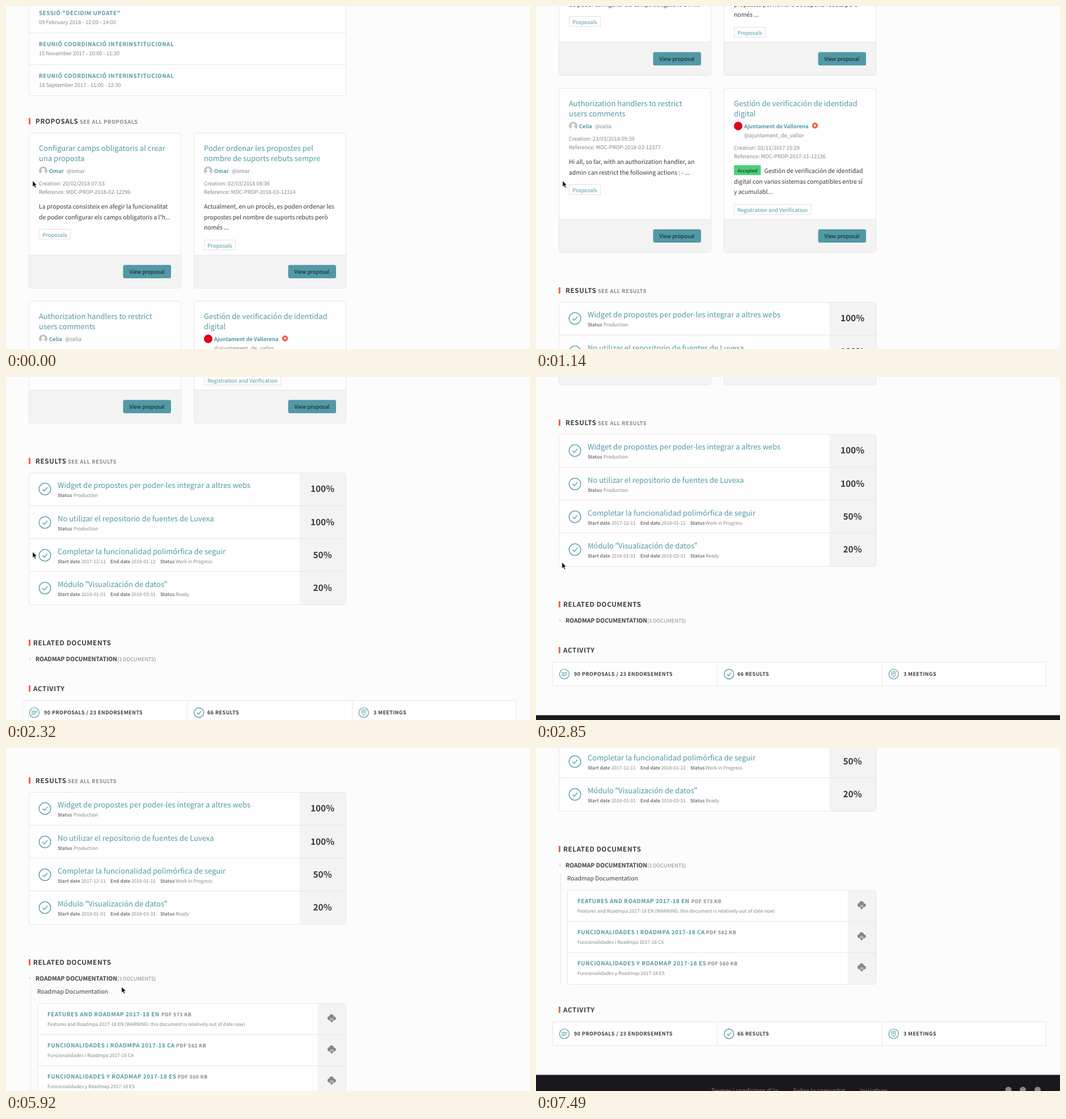
An HTML page that plays this animation: 924 by 606 pixels, repeating every 8540 ms.

```html
<!DOCTYPE html>
<html lang="en">
<head>
<meta charset="utf-8">
<title>Process page</title>
<style>
html, body { margin: 0; width: 100%; height: 100%; overflow: hidden; background: #fcfcfc; }
svg { display: block; }
text { font-family: "Noto Sans CJK JP", "Noto Sans CJK SC", "Noto Sans CJK", "Open Sans", sans-serif; text-rendering: geometricPrecision; }
.q { font-family: "Noto Sans", sans-serif; font-size: 14.5px; }
</style>
</head>
<body>
<svg id="stage" width="924" height="606" viewBox="0 0 924 606"></svg>
<script>
const TEAL = '#5299a6', GRAY = '#8a8688', DARK = '#3d393c', LINE = '#e6e6e6', PANEL = '#f3f3f3', RED = '#ef604d';
const FONT_SCALE = 0.899, LOOP = 8540, OPEN_SHIFT = 203;

// ---- drawing helpers ----
const text = (x, y, size, str, fill = GRAY, bold = false, spacing = 0, anchor = 'start') =>
  `<text x="${x}" y="${y}" font-size="${size * FONT_SCALE}" fill="${fill}" font-weight="${bold ? 600 : 400}" letter-spacing="${spacing}" text-anchor="${anchor}">${str}</text>`;
const rect = (x, y, w, h, fill, stroke = 'none', r = 0) =>
  `<rect x="${x}" y="${y}" width="${w}" height="${h}" fill="${fill}" stroke="${stroke}" rx="${r}"/>`;
const circle = (x, y, r, fill, stroke = 'none', width = 1.2) =>
  `<circle cx="${x}" cy="${y}" r="${r}" fill="${fill}" stroke="${stroke}" stroke-width="${width}"/>`;
const path = (d, stroke, width = 1, fill = 'none') =>
  `<path d="${d}" fill="${fill}" stroke="${stroke}" stroke-width="${width}"/>`;
const at = (x, y, body) => `<g transform="translate(${x} ${y})">${body}</g>`;

const heading = (x, y, title, link = '', linkX = 0) =>
  rect(40, y - 10, 3, 11, RED) + text(x, y, 13, title, DARK, true, 0.6) +
  text(linkX, y, 10.4, link, GRAY, true, 0.5);
const check = (x, y, r) => at(x, y,
  circle(0, 0, r, 'none', TEAL, 1.3) +
  path(`M${-r * .4} ${r * .02}L${-r * .08} ${r * .32}L${r * .44} ${-r * .3}`, TEAL, 1.3));
const avatar = (x, y) => at(x, y,
  circle(0, 0, 7.5, '#c3c1c2') + circle(0, -1.6, 2.9, '#fff') +
  path('M-5.2 5.4Q-4.6 1.8 0 1.8T5.2 5.4Q0 9.4-5.2 5.4Z', 'none', 0, '#fff'));
const star = (x, y) => {
  const pts = Array.from({ length: 10 }, (_, i) => {
    const a = i * Math.PI / 5 - Math.PI / 2, r = i % 2 ? 1.3 : 3;
    return `${r * Math.cos(a)},${r * Math.sin(a)}`;
  });
  return at(x, y, circle(0, 0, 5.2, RED) + `<polygon points="${pts.join(' ')}" fill="#fff"/>`);
};
const cloud = (x, y) => at(x, y,
  circle(-4, 0, 3.4, GRAY) + circle(4.2, .2, 3.2, GRAY) + circle(-.3, -2.6, 4.3, GRAY) +
  rect(-4, -1, 8.2, 4.4, GRAY) +
  path('M0 0V4', PANEL, 4.4) + path('M0 0V5', GRAY, 2) + path('M-3.6 3.8H3.6L0 7.8Z', 'none', 0, GRAY));

// ---- page sections ----
function meetings() {
  const rows = [
    ['SESSIÓ "DECIDIM UPDATE"', '09 February 2018 - 12:00 - 14:00'],
    ['REUNIÓ COORDINACIÓ INTERINSTITUCIONAL', '15 November 2017 - 10:00 - 11:30'],
    ['REUNIÓ COORDINACIÓ INTERINSTITUCIONAL', '18 September 2017 - 11:00 - 12:30']];
  return rect(40.5, -20, 559, 178.5, '#fefefe', LINE, 3) +
    path('M41 47.5H599M41 103.5H599', LINE) +
    rows.map(([title, date], i) =>
      text(58, 15.5 + i * 55.6, 11, title, TEAL, true, 0.54) +
      text(58, 31.6 + i * 55.5, 10.4, date)).join('');
}

function card(x, y, bottom, c) {
  const left = x + 17.5, meta = y + (c.official ? 108 : 92), body = meta + 41.5;
  const tagY = Math.round(body + (c.body.length - 1) * 18.6 + 17.4) + 0.5;
  const tagW = c.tag === 'Proposals' ? 56 : 136.5;
  let s = rect(x, y, 268, bottom - y, '#fefefe', LINE, 3) +
    rect(x + .5, bottom - 58.5, 267, 58, PANEL) +
    path(`M${x} ${bottom - 58.5}h268`, LINE);
  c.title.forEach((l, i) => s += text(left, y + 31.5 + i * 17.5, 14.5, l, TEAL));
  s += text(left + 18, y + 70.5, 10.4, c.name, TEAL, true);
  if (c.official) {
    s += circle(left + 7.5, y + 66.5, 7.5, '#e2001a') + star(x + 160.5, y + 65.8) +
      text(left + 18, y + 86.3, 10.4, c.handle) +
      rect(left, body - 13.7, 47.5, 17.5, '#4cd07a', 'none', 2) +
      text(left + 6.5, body - 1.3, 9.1, 'Accepted', '#1a181d');
  } else {
    s += avatar(left + 7.5, y + 66.5) + text(c.handleX, y + 70.5, 10.4, c.handle);
  }
  s += text(left, meta, 10.4, 'Creation: ' + c.created) +
    text(left, meta + 15.5, 10.4, 'Reference: MDC-PROP-' + c.ref);
  c.body.forEach((l, i) =>
    s += text(left + (c.official && !i ? 53.5 : 0), body + i * 18.6, 11.6, l, DARK));
  return s + rect(left + .5, tagY, tagW - 1, 17.5, '#fefefe', '#e0e0e0') +
    text(left + 6.2, tagY + 13, 10.5, c.tag, TEAL) +
    rect(x + 166, bottom - 41, 84.5, 23.5, TEAL, 'none', 3) +
    text(x + 208, bottom - 25.5, 10.5, 'View proposal', '#1a181d', false, 0, 'middle');
}

function proposals() {
  return heading(52, 208, 'PROPOSALS', 'SEE ALL PROPOSALS', 130) +
    card(40.5, 224.5, 498.5, {
      title: ['Configurar camps obligatoris al crear', 'una proposta'],
      name: 'Omar', handle: '@omar', handleX: 107, created: '20/02/2018 07:53', ref: '2018-02-12296',
      body: ['La proposta consisteix en afegir la funcionalitat', "de poder configurar els camps obligatoris a l'h..."],
      tag: 'Proposals' }) +
    card(331.5, 224.5, 498.5, {
      title: ['Poder ordenar les propostes pel', 'nombre de suports rebuts sempre'],
      name: 'Omar', handle: '@omar', handleX: 398, created: '02/03/2018 08:36', ref: '2018-03-12314',
      body: ['Actualment, en un procés, es poden ordenar les', 'propostes pel nombre de suports rebuts però', 'només ...'],
      tag: 'Proposals' }) +
    card(40.5, 521.5, 811.5, {
      title: ['Authorization handlers to restrict', 'users comments'],
      name: 'Celia', handle: '@celia', handleX: 104, created: '23/03/2018 09:39', ref: '2018-03-12377',
      body: ['Hi all, so far, with an authorization handler, an', 'admin can restrict the following actions : - ...'],
      tag: 'Proposals' }) +
    card(331.5, 521.5, 811.5, {
      title: ['Gestión de verificación de identidad', 'digital'], official: true,
      name: 'Ajuntament de Vallorena', handle: '@ajuntament_de_vallor', created: '02/11/2017 15:29', ref: '2017-11-12136',
      body: ['Gestión de verificación de identidad', 'digital con varios sistemas compatibles entre sí', 'y acumulabl...'],
      tag: 'Registration and Verification' });
}

function results() {
  const dates = (from, to, status) => [[91, 'Start date', 133, from], [184, 'End date', 221, to], [272, 'Status', 299, status]];
  const done = [[91, 'Status', 119, 'Production']];
  const rows = [
    ['Widget de propostes per poder-les integrar a altres webs', '100%', done],
    ['No utilizar el repositorio de fuentes de Luvexa', '100%', done],
    ['Completar la funcionalidad polimórfica de seguir', '50%', dates('2017-12-11', '2018-01-12', 'Work in Progress')],
    ['Módulo <tspan class="q">“</tspan>Visualización de datos<tspan class="q">”</tspan>', '20%', dates('2018-01-01', '2018-03-31', 'Ready')]];
  return heading(52, 883, 'RESULTS', 'SEE ALL RESULTS', 109) +
    rect(40.5, 899.5, 559, 233, '#fefefe', LINE, 3) + rect(517.5, 900, 81.5, 232, PANEL) +
    rows.map(([title, percent, facts], i) => {
      const y = 899 + Math.ceil(i * 58.25);
      return (i ? path(`M41 ${y - .5}H599`, LINE) : '') + check(68.6, y + 29, 10.3) +
        text(91, y + 27, 14.5, title, TEAL) +
        text(558, y + 34, 17.2, percent, DARK, true, 0, 'middle') +
        facts.map(([x, label, vx, value]) =>
          text(x, y + 43, 9.1, label, '#7d797b', true) + text(vx, y + 43, 9.28, value)).join('');
    }).join('');
}

const docsHeader = () => heading(48, 1204, 'RELATED DOCUMENTS') +
  path('M41.5 1225.5L44 1228L41.5 1230.5Z', 'none', 0, '#cfcfcf') +
  text(52, 1232, 11.55, 'ROADMAP DOCUMENTATION', DARK, true) + text(196, 1232, 10.2, '(3 DOCUMENTS)');

function docs() {
  const rows = [
    ['FEATURES AND ROADMAP 2017-18 EN', 274, 573, 'Features and Roadmpa 2017-18 EN (WARNING: this document is relatively out of date now)'],
    ['FUNCIONALIDADES I ROADMPA 2017-18 CA', 300, 582, 'Funcionalidades i Roadmpa 2017-18 CA'],
    ['FUNCIONALIDADES Y ROADMAP 2017-18 ES', 302.5, 560, 'Funcionalidades y Roadmap 2017-18 ES']];
  return path('M43.5 1241V1438', LINE) + text(55, 1255.3, 11.6, 'Roadmap Documentation', DARK) +
    rect(55.5, 1272.5, 544, 166, '#fefefe', LINE, 3) + rect(549.5, 1273, 49.5, 165, PANEL) +
    rows.map(([title, x, size, note], i) => {
      const y = 1272 + i * 55;
      return (i ? path(`M56 ${y + .5}H599`, LINE) : '') +
        text(73, y + 23.3, 11, title, TEAL, true, 0.55) +
        text(x, y + 23.3, 9.7, `PDF ${size} KB`, GRAY, true, 0.48) +
        text(73, y + 39.6, 9.28, note) + cloud(574.3, y + 26.5);
    }).join('');
}

function tail() {
  const label = (x, str) => text(x, 1326.3, 10, str, DARK, true, 0.46);
  return heading(48, 1285, 'ACTIVITY') +
    rect(29.5, 1301.5, 870, 42, '#fefefe', LINE) + path('M319.5 1302V1343M610.5 1302V1343', LINE) +
    circle(50, 1323, 8.5, 'none', TEAL) + path('M45 1320.5H55M45 1323H55M45 1325.5H52', TEAL) +
    check(340.3, 1323, 8.5) +
    circle(630.7, 1323, 8.5, 'none', TEAL) +
    path('M630.7 1328.5Q627 1323.5 627 1321.5A3.7 3.7 0 0 1 634.4 1321.5Q634.4 1323.5 630.7 1328.5Z', TEAL) +
    circle(630.7, 1321.6, 1.3, 'none', TEAL, 1) +
    label(67, '90 PROPOSALS / 23 ENDORSEMENTS') + label(355, '66 RESULTS') + label(648, '3 MEETINGS') +
    rect(0, 1395.5, 924, 120, '#1a181d') +
    text(309, 1427, 11.6, "Termes i condicions d'ús") + text(453.5, 1427, 11.6, 'Sobre la comunitat') +
    text(571.5, 1427, 11.6, 'Iniciatives') +
    [833, 858.5, 884.5].map(x => circle(x, 1422, 5.5, GRAY)).join('');
}

const $ = id => document.getElementById(id);
$('stage').innerHTML =
  `<g id="page">${meetings()}${proposals()}${results()}${docsHeader()}<g id="docs">${docs()}</g><g id="tail">${tail()}</g></g>` +
  `<g id="cursor">${path('M0 0V10.4L2.4 8.2L4.1 12.2L5.9 11.4L4.2 7.5H7.4Z', '#fff', .6, '#000')}</g>`;

// ---- motion ----
// Number of the n steps already taken; the first falls on start, the last on end.
const steps = (t, start, end, n) =>
  t < start ? 0 : Math.min(n, 1 + Math.floor((t - start) / (end - start) * (n - 1)));
const clamp = v => Math.max(0, Math.min(1, v));
const mix = (a, b, p) => a + (b - a) * p;

function scrollAt(t) {
  return 376 * steps(t, 150, 1140, 7) / 7 +
    354 * (steps(t, 1280, 2320, 8) / 8) ** 0.87 +
    91 * clamp(steps(t, 2500, 3530, 7) / 4) +
    200 * steps(t, 6070, 6540, 4) / 4;
}

function cursorAt(t) {
  if (t >= 6870) {
    const p = steps(t, 6870, 7335, 4) / 4;
    return [mix(204, 611, p), mix(422, 548, p)];
  }
  if (t >= 5620) {
    const p = steps(t, 5620, 5920, 3) / 3;
    return [mix(41, 204, p), mix(407, 422, p)];
  }
  if (t >= 4720) return [41, 407];
  if (t >= 4420) return [38, 408];
  if (t >= 3820) return [40.5, 405.5];
  if (t >= 3670) return [39.5, 404];
  const p = clamp((steps(t, 2500, 3530, 7) - 2) / 5);
  return [mix(47, 41, p), mix(309, 402, p)];
}

function draw(t) {
  const open = t >= 5320;
  const move = (id, x, y) => $(id).setAttribute('transform', `translate(${x} ${y})`);
  move('page', 0, -Math.round(scrollAt(t)));
  move('tail', 0, open ? OPEN_SHIFT : 0);
  move('cursor', ...cursorAt(t));
  $('docs').style.display = open ? '' : 'none';
  $('cursor').style.display = t < 7490 ? '' : 'none';
}

const began = performance.now();
(function frame() {
  draw((performance.now() - began) % LOOP);
  requestAnimationFrame(frame);
})();
</script>
</body>
</html>
```
